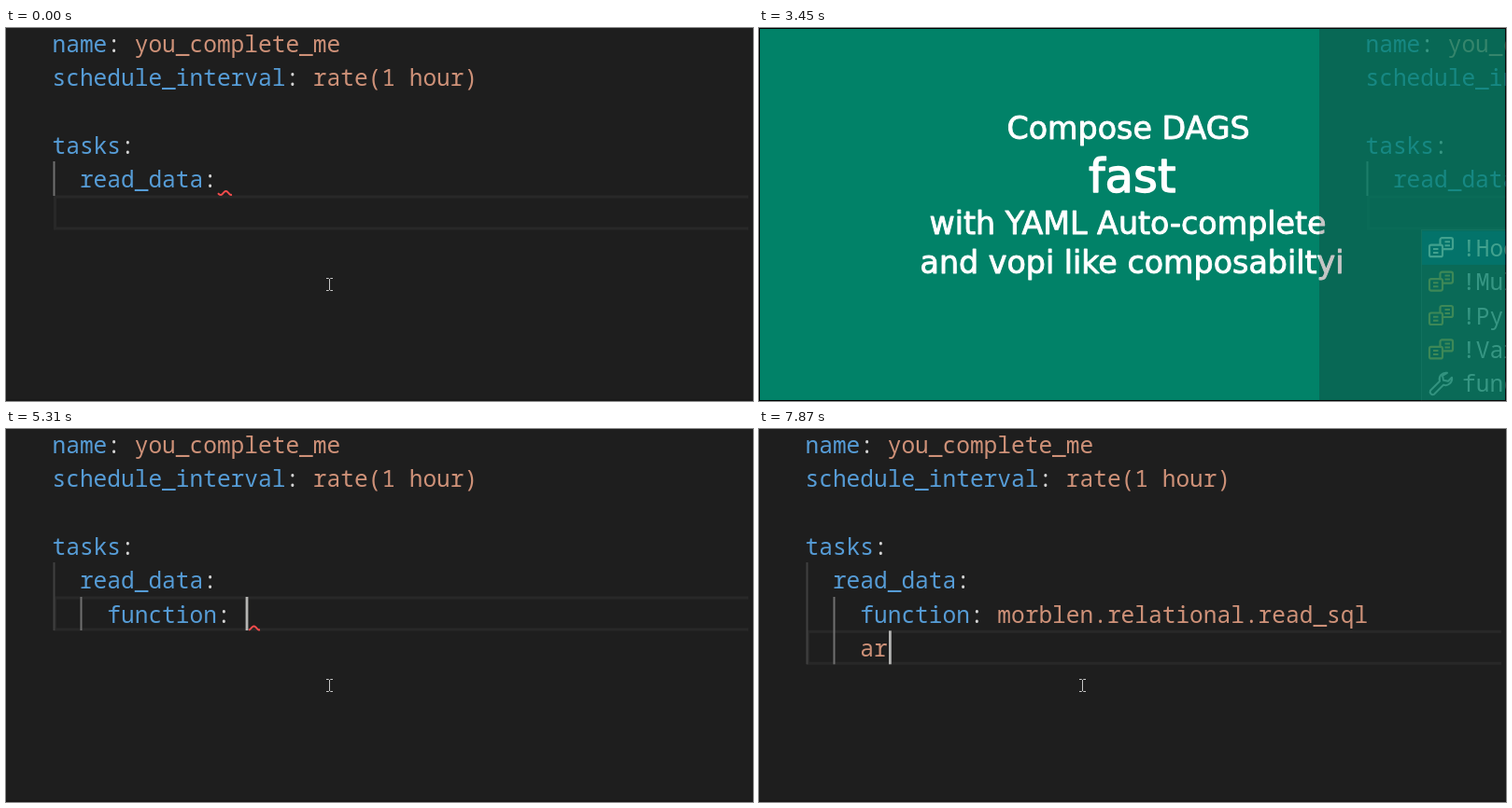
An HTML page with a canvas for the animation above (8 s loop, 800 px wide and 400 px high).

```html
<!DOCTYPE html>
<html lang="en">
<head>
<meta charset="utf-8">
<title>Auto-complete demo</title>
<style>
  html, body { margin: 0; width: 100%; height: 100%; overflow: hidden; background: #1e1e1e; }
  canvas { display: block; }
</style>
</head>
<body>
<canvas id="stage" width="800" height="400"></canvas>
<script>
const W = 800, H = 400, LOOP = 8000;
const CODE_FONT = '24.5px "Noto Sans Mono", monospace';
const BLUE = '#569cd6', ORANGE = '#ce9178', PALE = '#d4d4d4', BACK = '#1e1e1e';
const CHAR = 14.7, LEFT = 49.5, ROW = 36.3;

const stage = document.getElementById('stage').getContext('2d');
const buffer = new OffscreenCanvas(W, H);
const layer = buffer.getContext('2d');

const colX = col => LEFT + col * CHAR;
const rowTop = row => 180 + (row - 5) * ROW;

// Value of the last [time, value] pair that has been reached.
const at = (steps, t) => steps.findLast(([start]) => t >= start)[1];

const CHOICE = 'function: morblen.relational.read_sql';
const FIRST_LINE = [
  [0, ''], [4380, 'function'], [4840, 'function:'], [5210, 'function: '],
  [5580, 'function: r'], [5670, 'function: re'], [5860, 'function: rea'], [6960, CHOICE]
];
const SECOND_LINE = [[0, ''], [7510, 'a'], [7690, 'ar']];
const SELECTED = [
  [0, -1], [50, 0], [3840, 1], [3930, 2], [4020, 3], [4110, 4], [4380, -1],
  [6140, 0], [6780, 1], [6870, 2], [6960, -1]
];
const CARET = [[0, false], [3750, true], [4200, false], [4380, true]];
const BULB = [[0, false], [4660, true], [4840, false], [6330, true], [6960, false]];
// [from x, to x, y] of the red underline
const SQUIGGLE = [
  [0, [227, 242, 177]], [4380, null], [4570, [110, 227, 213.5]], [4840, null],
  [4930, [242, 257, 213.5]], [5210, null], [5310, [260, 272, 213.5]], [5580, null],
  [6330, [257, 301, 213.5]], [6960, null]
];

// Square brackets mark the matched letters.
const TAG_MENU = { x: 109.5, items: ['!Hook', '!MultiStep', '!Py', '!Var', 'function'] };
const FUNCTION_MENU = { x: 301.5, items: [
  'morblen.[re]l[a]tional.execute_many',
  'morblen.[re]l[a]tional.execute_query',
  'morblen.relational.[rea]d_sql',
  'morblen.filesystem.[rea]d_data',
  'functions.exchange_[r]at[e]s_[a]pi.get'
] };

const WRENCH = new Path2D('M20 1a7 7 0 0 0-8 9L2 20a3 3 0 0 0 4 4L16 14a7 7 0 0 0 9-8l-4 4-5-1-1-5z');
const HAND = new Path2D('M344 284V276.500q0-2 1.700-2t1.700 2V280.500q2-.8 2.500 .5q2-.6 2.300 .8q1.800 0 1.800 2V287q0 3-1.800 5.500H345.500Q342.500 288 340.500 285.500q0-2.500 3.500-.5z');
const BEAM = new Path2D('M343 268.500h2.500l1 1 1-1h2.500M346.500 269v12M343 281.500h2.500l1-1 1 1h2.500');

function write(c, text, x, y, color, font = CODE_FONT) {
  c.font = font;
  c.fillStyle = color;
  c.fillText(text, x, y);
}

function box(c, x, y, w, h, color) {
  c.fillStyle = color;
  c.fillRect(x, y, w, h);
}

function strokePath(c, path, color, width) {
  c.strokeStyle = color;
  c.lineWidth = width;
  c.stroke(path);
}

function codeLine(c, row, indent, text) {
  const y = rowTop(row) + 27.5, colon = text.indexOf(':');
  if (colon < 0) return write(c, text, colX(indent), y, ORANGE);
  write(c, text.slice(0, colon), colX(indent), y, BLUE);
  write(c, ':', colX(indent + colon), y, PALE);
  write(c, text.slice(colon + 1), colX(indent + colon + 1), y, ORANGE);
}

function squiggle(c, from, to, y) {
  const path = new Path2D(), peak = to - 6.5;
  for (let x = from; x <= to; x++) {
    path.lineTo(x, y - 2 * Math.cos((x - peak) * Math.PI * 2 / 11.5));
  }
  strokePath(c, path, '#f14c4c', 2);
}

function bulb(c) {
  c.fillStyle = '#ffcc00';
  c.beginPath();
  c.arc(66.5, 190.5, 9, 0, Math.PI * 2);
  c.roundRect(62, 196, 9, 11.5, 2);
  c.fill();
}

function valueIcon(c, color, back) {
  const upper = new Path2D(), lower = new Path2D(), lines = new Path2D();
  upper.roundRect(12.5, 2, 13.5, 12, 2);
  lower.roundRect(1, 9.5, 14, 12.5, 2);
  for (const [x, y] of [[17.5, 6], [17.5, 10], [5, 13.7], [5, 17.7]]) {
    lines.moveTo(x, y);
    lines.lineTo(x + 5.5, y);
  }
  strokePath(c, upper, color, 2.2);
  c.fillStyle = back;
  c.fill(lower);
  strokePath(c, lower, color, 2.2);
  strokePath(c, lines, color, 2);
}

function menu(c, { x, items }, selected) {
  const pitch = 36.4, top = 217.5;
  box(c, x - .5, 216, W, H, '#454545');
  box(c, x + .5, 217, W, H, '#252526');
  items.forEach((item, i) => {
    const active = i === selected, y = top + i * pitch, middle = y + pitch / 2;
    if (active) box(c, x + .5, y, W, pitch, '#094771');
    c.save();
    c.translate(x + 7.5, middle - 12.5);
    if (item === 'function') strokePath(c, WRENCH, active ? '#fff' : '#c5c5c5', 2);
    else valueIcon(c, active ? '#fff' : '#ee9d28', active ? '#094771' : '#252526');
    c.restore();
    let textX = x + 43.5;
    item.split(/[\[\]]/).forEach((part, k) => {
      const match = k % 2;
      write(c, part, textX, middle + 9, match ? '#18a3ff' : active ? '#fff' : PALE,
        match ? 'bold ' + CODE_FONT : CODE_FONT);
      textX += part.length * CHAR;
    });
  });
}

function editor(c, t) {
  const row = t < 7060 ? 5 : 6, top = rowTop(row);
  const first = at(FIRST_LINE, t), second = at(SECOND_LINE, t);
  box(c, 0, 0, W, H, BACK);
  box(c, 0, 398, W, 2, '#191919');

  box(c, 51, top - .5, 744, 3, '#282828');
  box(c, 51, top + 33.5, 744, 3, '#282828');
  box(c, 51, top, 3, 36, '#282828');
  const bottom = top + 36;
  if (first) {
    box(c, 50.5, 143, 2, bottom - 143, '#404040');
    box(c, 79.5, 180, 2, bottom - 180, '#707070');
  } else {
    box(c, 50.5, 143, 2, 37, '#707070');
  }

  codeLine(c, 0, 0, 'name: you_complete_me');
  codeLine(c, 1, 0, 'schedule_interval: rate(1 hour)');
  codeLine(c, 3, 0, 'tasks:');
  codeLine(c, 4, 2, 'read_data:');
  codeLine(c, 5, 4, first);
  codeLine(c, 6, 4, second);

  const underline = at(SQUIGGLE, t);
  if (underline) squiggle(c, ...underline);
  if (at(BULB, t)) bulb(c);
  if (at(CARET, t)) {
    const typed = row === 5 ? first : second;
    box(c, colX(4 + typed.length) + 1.3, top, 2.8, 36, '#b4b4b2');
  }

  const selected = at(SELECTED, t);
  if (selected < 0) {
    strokePath(c, BEAM, '#c8c8c8', 1);
  } else {
    menu(c, t < 5000 ? TAG_MENU : FUNCTION_MENU, selected);
    c.fillStyle = '#fff';
    c.fill(HAND);
    strokePath(c, HAND, '#111', 1);
  }
}

// A thin round outline gives the heading its soft, heavier letters.
function heading(c, text, x, y, size) {
  write(c, text, x, y, '#fff', `${size}px "DejaVu Sans", sans-serif`);
  c.strokeStyle = '#fff';
  c.lineWidth = size / 36;
  c.lineJoin = 'round';
  c.strokeText(text, x, y);
}

function titleCard(c) {
  box(c, 0, 0, W, H, '#000');
  box(c, 1, 1, W - 2, H - 2, '#018268');
  heading(c, 'Compose DAGS', 265.5, 119, 33.3);
  heading(c, 'fast', 353, 176, 49.8);
  heading(c, 'with YAML Auto-complete', 182.5, 221, 33.3);
  heading(c, 'and vopi like composabiltyi', 172.5, 263, 33.3);
}

// The next scene slides in from the right while fading in, in quarter steps.
function slideOver(scene, elapsed, t) {
  const progress = (Math.floor(elapsed / 70) + 1) / 4;
  scene(layer, t);
  stage.globalAlpha = progress;
  stage.drawImage(buffer, W * (1 - progress), 0);
  stage.globalAlpha = 1;
}

function render(t) {
  if (t >= 450 && t < 3660) titleCard(stage);
  else editor(stage, t);
  if (t >= 240 && t < 450) slideOver(titleCard, t - 240, t);
  if (t >= 3450 && t < 3660) slideOver(editor, t - 3450, t);
}

function tick() {
  render(performance.now() % LOOP);
  requestAnimationFrame(tick);
}
tick();
</script>
</body>
</html>
```
